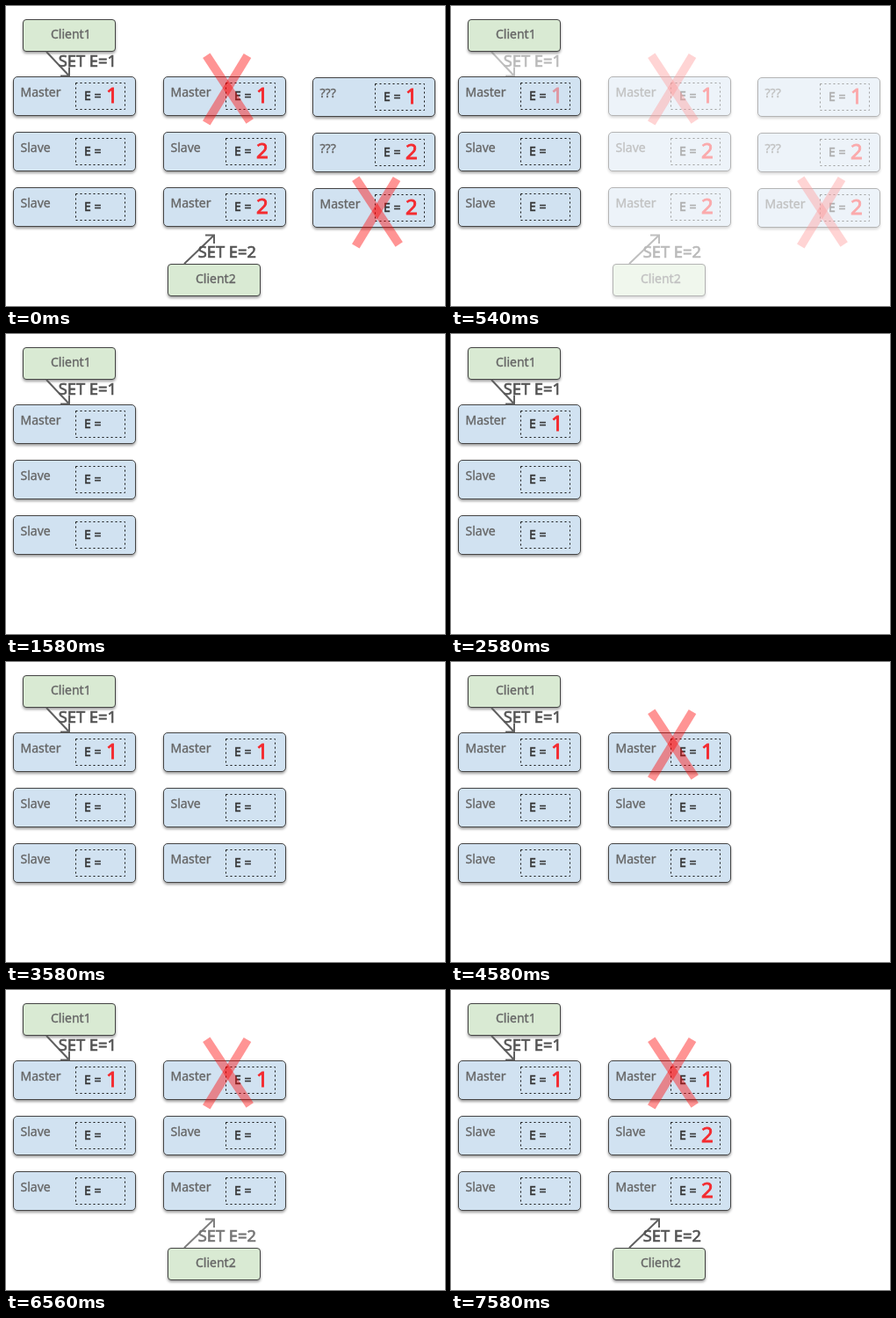
An HTML page for the animation above (8000 ms loop, 500x341 px).

```html
<!DOCTYPE html>
<html lang="en">
<head>
<meta charset="utf-8">
<title>Replicated writes</title>
<style>
  html, body { margin: 0; height: 100%; overflow: hidden; background: #fff; }
  svg { display: block; }
  text { font: 14px "Noto Sans", "Open Sans", sans-serif; fill: #666; stroke: #666; stroke-width: .35; }
  .eq { fill: #333; stroke: #333; stroke-width: .5; }
  .set { font-size: 18.3px; fill: #555; stroke: #555; stroke-width: .7; }
  .value { font-size: 24px; fill: #f42a2f; stroke: #f42a2f; stroke-width: .9; }
  .box { stroke: #444; filter: drop-shadow(0 2px 1.5px rgba(0, 0, 0, .38)); }
  .slot { fill: none; stroke: #111; stroke-dasharray: 2 3; }
  .arrow { fill: none; stroke: #606060; stroke-width: 2; }
  .cross { fill: none; stroke: red; stroke-opacity: .42; stroke-width: 10; }
</style>
</head>
<body>
<svg width="500" height="341" viewBox="0 0 500 341"></svg>
<script>
const LOOP = 8000, FADE_OUT = 500, STEP = 20, STEPS = 5;

const at = (x, y, body) => `<g transform="translate(${x} ${y})">${body}</g>`;
const text = (x, y, label, cls = '') => `<text x="${x}" y="${y}" class="${cls}">${label}</text>`;
const path = (cls, d) => `<path class="${cls}" d="${d}"/>`;
const box = (w, h, r, fill) =>
  `<rect class="box" x=".5" y=".5" width="${w}" height="${h}" rx="${r}" fill="${fill}"/>`;

const client = (x, y, name) => at(x, y, box(105, 36, 3.5, '#d9ead3') + text(32, 22, name));
const node = role => box(139, 44, 4.5, '#d1e2f1') + text(8.5, 23, role) +
  '<rect class="slot" x="71.5" y="7.5" width="56" height="30"/>' + text(81, 27, 'E =', 'eq');
const column = (x, y, roles) => roles.map((role, i) => at(x, y + 63 * i, node(role))).join('');
const value = (x, y, row, digit) => text(x + 106, y + 63 * row + 30, digit, 'value');
const cross = (x, y) => at(x, y, path('cross', 'M4.3 3.3L53.7 78') + path('cross', 'M51 3.5L4.3 80'));

// Items that vanish together and return one by one; Infinity never returns.
const items = [
  [1500, path('arrow', 'M46 52L72 79.5M62 79.5H72V69.5') + text(59.7, 69, 'SET E=1', 'set')],
  [2500, value(8, 80, 0, 1)],
  [3500, column(179, 80, ['Master', 'Slave', 'Master']) + value(179, 80, 0, 1)],
  [7500, value(179, 80, 1, 2) + value(179, 80, 2, 2)],
  [4500, cross(224, 53)],
  [5500, client(184, 293, 'Client2')],
  [6500, path('arrow', 'M203 293L237 260.5M227 260.5H237V270') + text(218.7, 286, 'SET E=2', 'set')],
  [Infinity, column(349, 81, ['???', '???', 'Master']) +
    [1, 2, 2].map((digit, row) => value(349, 81, row, digit)).join('') + cross(394, 193)]
];

const svg = document.querySelector('svg');
svg.innerHTML = client(19, 15, 'Client1') + column(8, 80, ['Master', 'Slave', 'Slave']) +
  `<g id="extras">${items.map(([, body]) => `<g>${body}</g>`).join('')}</g>`;
const extras = document.getElementById('extras');
const groups = [...extras.children];

const ramp = (t, start) =>
  t < start ? 0 : Math.min(1, (Math.floor((t - start) / STEP) + 1) / STEPS);

function draw(t) {
  const faded = ramp(t, FADE_OUT);
  const gone = faded === 1;
  extras.style.opacity = gone ? 1 : 1 - faded;
  groups.forEach((group, i) => group.style.opacity = gone ? ramp(t, items[i][0]) : 1);
}

const begin = performance.now();
function tick() {
  draw((performance.now() - begin) % LOOP);
  requestAnimationFrame(tick);
}
tick();
</script>
</body>
</html>
```
